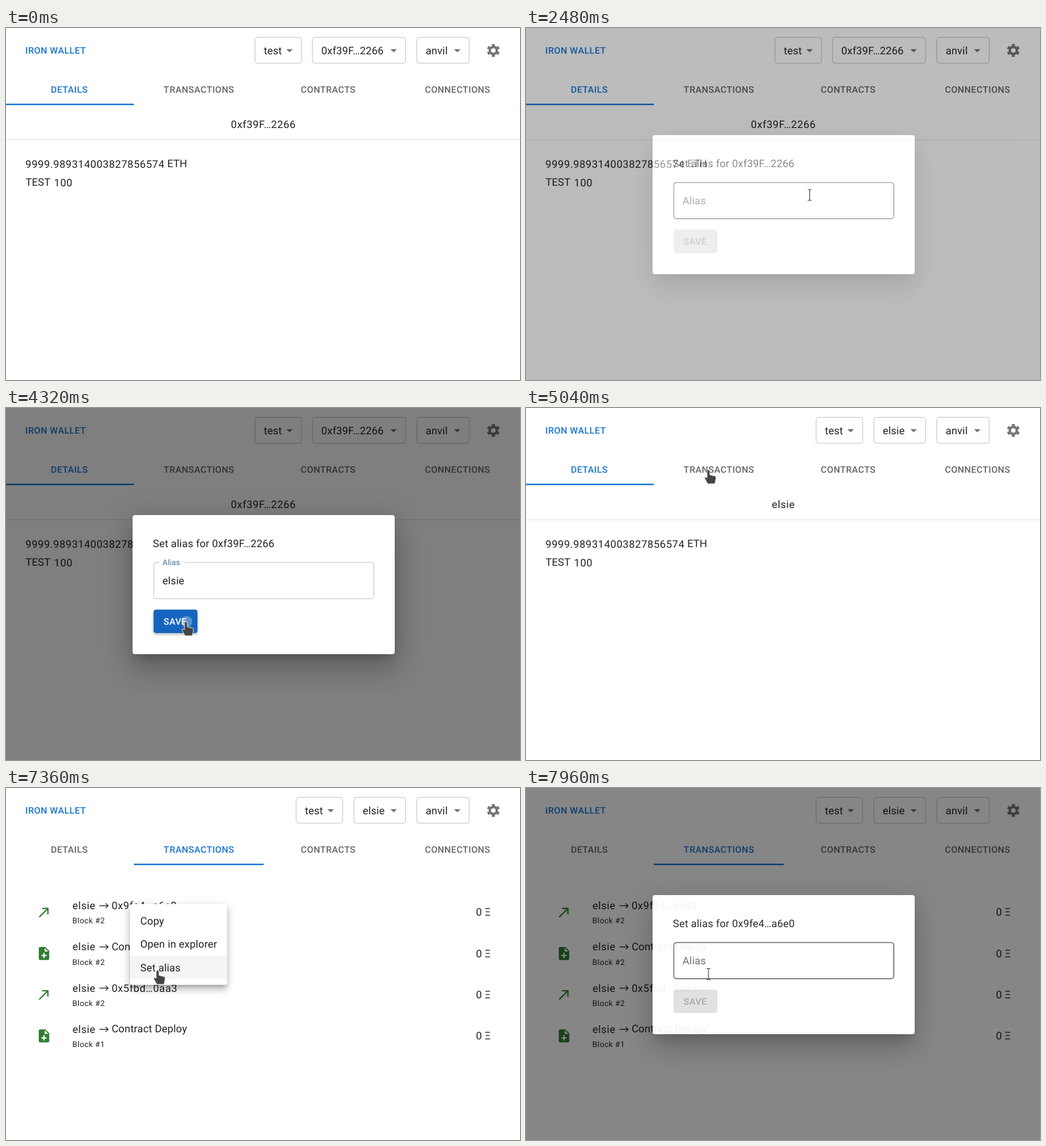
Write an HTML page that moves like this. It is 800 by 549 pixels and loops after 8000 ms.

```html
<!DOCTYPE html>
<html lang="en">
<head>
<meta charset="utf-8">
<title>Wallet alias</title>
<style>
  html, body { margin: 0; width: 100%; height: 100%; overflow: hidden; background: #fff; }
  #stage { position: relative; width: 800px; height: 549px; overflow: hidden; }
  #stage > *, #dialog > * { position: absolute; left: 0; top: 0; }
  svg { display: block; overflow: visible; }
  text { font: 16.24px Roboto, sans-serif; letter-spacing: .15px; fill: #212121;
         white-space: pre; text-rendering: geometricPrecision; }
  .wide { letter-spacing: .5px; }
  .caps { font-size: 14.2px; font-weight: 500; letter-spacing: .406px; }
  .tab { text-anchor: middle; }
  .small { font-size: 12.18px; letter-spacing: .406px; }
  .mid { text-anchor: middle; }
  .end { text-anchor: end; }
  .blue { fill: #1976d2; }
  .grey { fill: #666; }
  .box { fill: none; stroke: #c4c4c4; }
  .icon { fill: #2e7d32; }
  #dialog, #shade { width: 800px; height: 549px; }
  #shade { background: rgba(0,0,0,.5); }
  #paper { left: 197px !important; top: 167px !important; width: 408px; height: 216.5px;
           background: #fff; border-radius: 4px;
           box-shadow: 0 11px 15px -7px rgba(0,0,0,.2), 0 24px 38px 3px rgba(0,0,0,.14), 0 9px 46px 8px rgba(0,0,0,.12); }
  #menu { width: 151px; height: 126px; background: #fff; border-radius: 4px; transform-origin: 0 0;
          box-shadow: 0 5px 5px -3px rgba(0,0,0,.2), 0 8px 10px 1px rgba(0,0,0,.14), 0 3px 14px 2px rgba(0,0,0,.12); }
  #saveOn { filter: drop-shadow(0 2px 2px rgba(0,0,0,.3)); }
</style>
</head>
<body>
<div id="stage">
  <svg id="page" width="800" height="549"></svg>
  <div id="menu"><svg id="menuArt" width="151" height="126"></svg></div>
  <div id="dialog">
    <div id="shade"></div>
    <div id="paper"></div>
    <svg id="form" width="800" height="549"></svg>
  </div>
  <svg id="cursor" width="800" height="549">
    <g id="pointer">
      <path id="arrow" d="M0 0V16l4-3.6 2.6 5.6 2.4-1.1-2.6-5.5H12z" fill="#333" stroke="#fff" stroke-width=".9"/>
      <path id="hand" d="M-2.2 1.5a2.2 2.2 0 0 1 4.4 0V7.2l7.6 1.9q2.2.7 2 3l-1 5.4q-.3 2.2-1.4 3.7H-.2q-1 0-2-1.5L-6 12.5q-.5-1.5 1-1.8l2.8 1z"
            fill="#444" stroke="#fff" stroke-width=".8"/>
      <path id="beam" d="M-3-8.5h2l1 1 1-1h2M0-7.5v15M-3 8.5h2l1-1 1 1h2" fill="none" stroke="#444" stroke-width="1.1"/>
    </g>
  </svg>
</div>
<script>
const LOOP = 8000, ALIAS = 'elsie', OWNER = '0xf39F…2266', TARGET = '0x9fe4…a6e0';
const MENU_CLOSE = 2320, DIALOG_OPEN = 2400, FOCUS = 2840, PRESS = 4250, SAVED = 4360, TAB = 5200;
const KEYS = [3200, 3300, 3420, 3540, 3640];
const $ = id => document.getElementById(id);
const text = (x, y, s, cls = '') => `<text x="${x}" y="${y}" class="${cls}">${s}</text>`;
const show = (id, on) => { $(id).style.display = on ? '' : 'none'; };
const attrs = (id, values) => { for (const k in values) $(id).setAttribute(k, values[k]); };
const clamp = v => Math.min(1, Math.max(0, v));
const mix = (a, b, p) => a + (b - a) * p;

// cubic-bezier(.4, 0, .2, 1)
function ease(x) {
  x = clamp(x);
  let lo = 0, hi = 1, s = .5;
  for (let i = 0; i < 18; i++) {
    s = (lo + hi) / 2;
    const at = 1.2 * s * (1 - s) ** 2 + .6 * s * s * (1 - s) + s ** 3;
    if (at < x) lo = s; else hi = s;
  }
  return 3 * s * s * (1 - s) + s ** 3;
}

function select(left, right, label) {
  const c = right - 19.2;
  return `<rect class="box" x="${left + .5}" y="14.5" width="${right - left - 1}" height="40.5" rx="4"/>` +
    text(left + 14.2, 40.7, label) + `<path d="M${c - 5} 33h10l-5 5z" fill="#757575"/>`;
}

function transaction(i, to, block) {
  const y = 183 + 64.25 * i;
  const icon = i % 2
    ? 'M14 2H6c-1.1 0-2 .9-2 2v16c0 1.1.9 2 2 2h12c1.1 0 2-.9 2-2V8zm2 14h-3v3h-2v-3H8v-2h3v-3h2v3h3zm-3-7V3.5L18.5 9z'
    : 'M9 5v2h6.6L4 18.6 5.4 20 17 8.4V15h2V5z';
  return `<path class="icon" d="${icon}" transform="translate(47 ${y - 1.3}) scale(1.015)"/>` +
    text(103.4, y + 6, ALIAS, 'wide') +
    `<path d="M145.5 ${y + .7}h13.5m-4-3.7l4 3.7-4 3.7" fill="none" stroke="#212121" stroke-width="1.2"/>` +
    text(164.4, y + (i % 2 ? 5.4 : 6), to, i % 2 ? '' : 'wide') +
    text(103.3, y + 28.3, 'Block #' + block, 'small') + text(754.5, y + 16.3, '0 Ξ', 'end');
}

$('page').innerHTML =
  text(30, 39.8, 'IRON WALLET', 'caps blue') +
  `<g id="headOld">${select(387, 460.5, 'test') + select(476.5, 622.5, OWNER)}</g>` +
  `<g id="headNew">${select(451, 524.5, 'test') + select(541, 622.5, ALIAS)}</g>` +
  select(639, 721.5, 'anvil') +
  `<g fill="none" stroke="#757575" transform="translate(758.5 35)">
     <circle r="5.5" stroke-width="3.8"/>
     <circle r="8.5" stroke-width="3.2" pathLength="60" stroke-dasharray="5.2 4.8" stroke-dashoffset="-2.4"/>
   </g>` +
  ['DETAILS', 'TRANSACTIONS', 'CONTRACTS', 'CONNECTIONS'].map((name, i) =>
    `<g id="tab${i}">${text([98.7, 300.3, 501.6, 702.9][i], 101, name, 'caps tab')}</g>`).join('') +
  '<rect id="indicator" class="blue" y="118" height="2.3"/>' +
  `<g id="details">
     <rect id="hover" x="349" y="137" width="103" height="27.5" rx="4" fill="#1976d2" opacity=".05"/>
     <g id="ownerOld">${text(400.6, 156, OWNER, 'wide mid')}</g>
     <g id="ownerNew">${text(400.6, 156, ALIAS, 'wide mid')}</g>
     <path d="M0 174.3H800" stroke="#e0e0e0"/>
     ${text(30.3, 218.2, '9999.989314003827856574', 'wide') + text(251, 217.4, 'ETH')}
     ${text(30.4, 246, 'TEST') + text(74.8, 246.8, '100', 'wide')}
   </g>` +
  `<g id="list">${transaction(0, TARGET, 2) + transaction(1, 'Contract Deploy', 2) +
    transaction(2, '0x5fbd…0aa3', 2) + transaction(3, 'Contract Deploy', 1)}</g>`;

$('menuArt').innerHTML = '<rect id="lit" width="151" height="36.5" fill="#f5f5f5"/>' +
  ['Copy', 'Open in explorer', 'Set alias'].map((s, i) => text(16, 31.7 + 36.5 * i, s)).join('');

$('form').innerHTML =
  `<g id="titleOld">${text(228.6, 217.4, 'Set alias for ' + OWNER)}</g>` +
  `<g id="titleNew">${text(228.6, 217.4, 'Set alias for ' + TARGET)}</g>` +
  `<rect id="field" x="230" y="241" width="342.5" height="56.5" rx="4" fill="none"/>
   <rect id="notch" y="239" height="4" fill="#fff"/>
   <g id="label"><text id="labelText">Alias</text></g>
   <text id="value" x="243.4" y="274.7"></text>
   <rect id="caret" y="259" width="1" height="19" fill="#212121"/>
   <rect x="229.7" y="314.5" width="68.3" height="36.5" rx="4" fill="#e0e0e0"/>
   <text x="245.2" y="337.8" class="caps" style="fill:#a6a6a6">SAVE</text>
   <clipPath id="clip"><rect x="229.7" y="314.5" width="68.3" height="36.5" rx="4"/></clipPath>
   <g id="saveOn">
     <rect id="saveFill" x="229.7" y="314.5" width="68.3" height="36.5" rx="4"/>
     <text x="245.2" y="337.8" class="caps" style="fill:#fff">SAVE</text>
     <circle id="ripple" cx="281" cy="333" fill="#fff" opacity=".3" clip-path="url(#clip)"/>
   </g>`;

// time, x, y of the pointer's hot spot
const PATH = [
  [720, 692, 248], [1480, 411, 152], [1700, 412, 150], [1800, 409, 157], [1920, 411, 165], [2320, 441, 256],
  [2400, 441, 257], [2560, 442, 264], [2880, 405, 272], [3640, 405, 272], [4000, 281, 336],
  [4240, 280, 334], [4520, 280, 334], [5040, 284, 97], [5440, 284, 97], [6000, 109, 181],
  [6160, 113, 185], [6360, 113, 185], [6840, 193, 181], [7160, 190, 183], [7360, 236, 285],
  [7720, 236, 285], [7960, 284, 290]
];
const HAND = [[1460, 2400], [3960, SAVED], [4980, 5520], [5940, 6360], [6660, 7800]];

function pointerAt(t) {
  const i = PATH.findIndex(p => p[0] > t);
  if (i < 0) return PATH[PATH.length - 1].slice(1);
  if (!i) return null;
  const [a, b] = [PATH[i - 1], PATH[i]];
  const p = (t - a[0]) / (b[0] - a[0]), s = p * p * (3 - 2 * p);
  return [mix(a[1], b[1], s), mix(a[2], b[2], s)];
}

function drawPage(t) {
  const saved = t >= SAVED, list = t >= TAB, slide = ease((t - TAB) / 300);
  show('headOld', !saved); show('headNew', saved);
  show('ownerOld', !saved); show('ownerNew', saved);
  show('details', !list); show('list', list);
  show('hover', t >= 1480 && t < DIALOG_OPEN);
  for (let i = 0; i < 4; i++) {
    $('tab' + i).firstChild.setAttribute('class', 'caps tab ' + (i === +list ? 'blue' : 'grey'));
  }
  attrs('indicator', { x: 199 * slide, width: mix(199, 202, slide) });
}

function drawMenu(t, pos) {
  const second = t > 6000;
  const [open, close, x, y] = second ? [6920, 7720, 193, 181] : [1700, MENU_CLOSE, 412, 150];
  const visible = t >= open && t < close + 160;
  show('menu', visible);
  if (!visible) return;
  const grow = ease((t - open) / 152);
  const style = $('menu').style;
  style.left = x + 'px';
  style.top = y + 'px';
  style.opacity = ease((t - open) / 230) * (1 - ease((t - close) / 160));
  style.transform = `scale(${mix(.75, 1, grow)}, ${mix(.5625, 1, grow)})`;
  const row = Math.floor((pos[1] - y - 8) / 36.5);
  show('lit', pos[0] > x && row >= 0 && row < 3);
  attrs('lit', { y: 8 + 36.5 * row });
}

function drawDialog(t, inField) {
  const second = t > 6000, open = second ? 7800 : DIALOG_OPEN;
  const visible = t >= open && (second || t < SAVED);
  show('dialog', visible);
  if (!visible) return;
  $('dialog').style.opacity = ease((t - open) / 225);
  show('titleOld', !second); show('titleNew', second);

  const focused = t >= FOCUS && t < PRESS;
  const float = second ? 0 : ease((t - FOCUS) / 200);
  attrs('field', {
    stroke: focused ? '#1976d2' : inField ? '#212121' : '#c4c4c4',
    'stroke-width': focused ? 2 : 1
  });
  attrs('notch', { x: mix(258, 239, float), width: 38 * float });
  attrs('label', { transform: `translate(243.6 ${mix(274.7, 244.8, float)}) scale(${mix(1, .75, float)})` });
  const tint = float * (1 - ease((t - PRESS) / 200));
  $('labelText').style.fill = `rgb(${[25, 118, 210].map(c => mix(102, c, tint))})`;

  const typed = second ? 0 : KEYS.filter(k => t >= k).length;
  const value = $('value');
  value.textContent = ALIAS.slice(0, typed);
  const last = typed ? KEYS[typed - 1] : FOCUS;
  show('caret', focused && (t - last) % 1000 < 500);
  attrs('caret', { x: 244 + (typed ? value.getComputedTextLength() : 0) });

  $('saveOn').style.opacity = second ? 0 : ease((t - KEYS[0]) / 250);
  attrs('saveFill', { fill: t >= 3960 ? '#1565c0' : '#1976d2' });
  attrs('ripple', { r: t < PRESS ? 0 : 6 + 60 * ease((t - PRESS) / 550) });
}

function frame() {
  const t = performance.now() % LOOP;
  const pos = pointerAt(t);
  const dialogOpen = (t >= DIALOG_OPEN && t < SAVED) || t >= 7800;
  const inField = !!pos && dialogOpen && pos[0] > 230 && pos[0] < 572 && pos[1] > 241 && pos[1] < 298;
  const hand = !inField && HAND.some(([a, b]) => t >= a && t < b);
  drawPage(t);
  drawMenu(t, pos);
  drawDialog(t, inField);
  show('pointer', pos);
  if (pos) attrs('pointer', { transform: `translate(${pos})` });
  show('beam', inField);
  show('hand', hand);
  show('arrow', !inField && !hand);
  requestAnimationFrame(frame);
}
frame();
</script>
</body>
</html>
```
